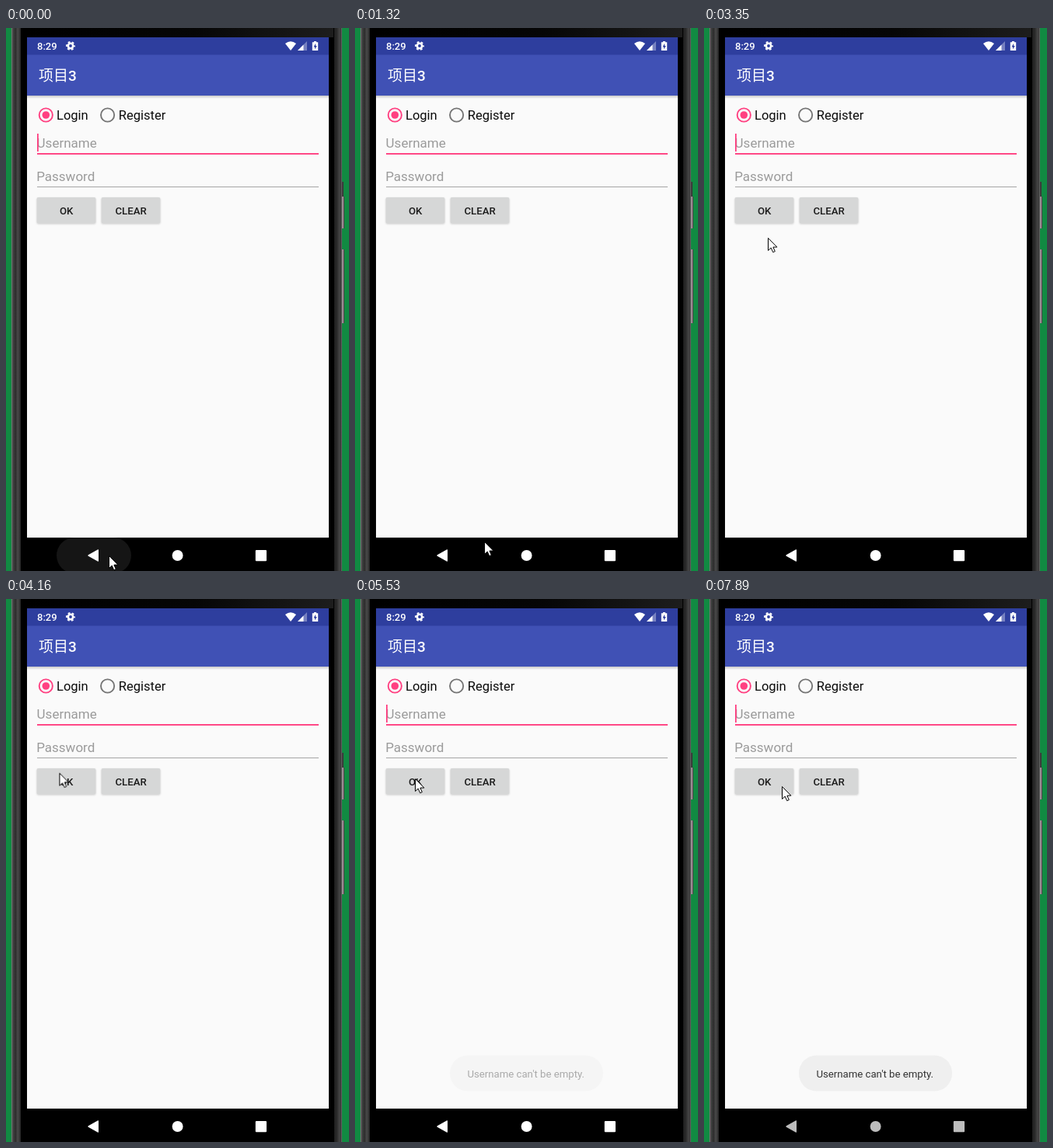
Animation of 441 by 699 pixels, one loop 8000 ms. Source, as an HTML page:

```html
<!DOCTYPE html>
<html lang="en">
<head>
<meta charset="utf-8">
<title>Login form</title>
<style>
  html, body { margin: 0; width: 100%; height: 100%; overflow: hidden; background: #118a42; }
  svg { display: block; width: 441px; height: 699px; }
  text { font-family: Roboto, "Noto Sans CJK SC", "Noto Sans CJK", sans-serif; white-space: pre; }
  .label { font-size: 16.5px; fill: #0c0c0c; }
  .hint { font-size: 17px; fill: #9b9b9b; }
  .caps { font-size: 13.2px; font-weight: 500; fill: #1c1c1c; text-anchor: middle; }
  .key { fill: #d6d7d7; }
  .shade { fill: #000; opacity: .16; filter: blur(.8px); }

  .ripple, .caret, .cursor, .toast, .press, .lift, .nav { animation: 8s linear infinite; }
  .ripple { animation-name: ripple; animation-timing-function: step-end; }
  .caret { animation-name: blink; animation-timing-function: step-end; }
  .cursor { animation-name: move; }
  .toast { animation-name: toast; }
  .press, .lift { opacity: 0; animation-name: press; }
  .nav { fill: #fff; animation-name: dim; }

  @keyframes ripple { 0% { opacity: 1 } 1.25%, 100% { opacity: 0 } }
  @keyframes blink {
    0%, 20.25%, 53.75%, 88.375% { opacity: 1 }
    1.25%, 43.125%, 71.625% { opacity: 0 }
    100% { opacity: 1 }
  }
  @keyframes move {
    0%, 2.5% { transform: translate(132px, 679px) }
    12.75%, 14% { transform: translate(158px, 670px) }
    16.5% { transform: translate(166px, 661px) }
    24% { transform: translate(202px, 598px) }
    30.25% { transform: translate(139px, 419px) }
    35.25% { transform: translate(100px, 365px) }
    41.875% { transform: translate(82px, 270px) }
    45.625% { transform: translate(77px, 244px) }
    50.25%, 51% { transform: translate(64px, 220px) }
    54%, 84.75% { transform: translate(77px, 231px) }
    93.375%, 100% { transform: translate(100px, 241px) }
  }
  @keyframes press {
    0%, 54.25% { opacity: 0 }
    56%, 58.5% { opacity: 1 }
    60.125%, 62% { opacity: .55 }
    66%, 100% { opacity: 0 }
  }
  @keyframes toast {
    0%, 61.6% { opacity: 0 }
    80.375%, 100% { opacity: 1 }
  }
  @keyframes dim {
    0%, 75% { fill: #fff }
    93.375% { fill: #cfcfcf; animation-timing-function: step-end }
    98.625%, 100% { fill: #bdbdbd }
  }
</style>
</head>
<body>
<svg viewBox="0 0 441 699">
  <defs>
    <linearGradient id="left">
      <stop offset="0" stop-color="#858585"/>
      <stop offset=".12" stop-color="#484848"/>
      <stop offset=".4" stop-color="#2c2c2c"/>
      <stop offset=".62" stop-color="#4a4a4a"/>
      <stop offset="1" stop-color="#1c1c1c"/>
    </linearGradient>
    <linearGradient id="right">
      <stop offset="0" stop-color="#1c1c1c"/>
      <stop offset=".4" stop-color="#2a2a2a"/>
      <stop offset=".7" stop-color="#444"/>
      <stop offset=".9" stop-color="#3a3a3a"/>
      <stop offset="1" stop-color="#808080"/>
    </linearGradient>
    <linearGradient id="top">
      <stop offset="0" stop-color="#000"/>
      <stop offset=".55" stop-color="#060606"/>
      <stop offset="1" stop-color="#1d1d1d"/>
    </linearGradient>
    <linearGradient id="fall" x2="0" y2="1">
      <stop offset="0" stop-color="#000" stop-opacity=".2"/>
      <stop offset="1" stop-color="#000" stop-opacity="0"/>
    </linearGradient>
  </defs>

  <!-- phone body -->
  <rect width="441" height="699" fill="#118a42"/>
  <path d="M432 198h2v19h-2z" fill="#3a3a3a"/>
  <path d="M432 217h3v41h-3zM432 285h3v95h-3z" fill="#9b8c93"/>
  <path d="M434 217h1v41h-1zM434 285h1v95h-1z" fill="#4c4449"/>
  <rect x="7" width="13" height="699" fill="url(#left)"/>
  <rect x="421" width="11" height="699" fill="url(#right)"/>
  <rect x="19" width="403" height="699"/>
  <rect x="27" width="394" height="12" fill="url(#top)"/>

  <!-- screen -->
  <rect x="27" y="12" width="388" height="644" fill="#fafafa"/>
  <rect x="27" y="87" width="388" height="4" fill="url(#fall)"/>
  <rect x="27" y="12" width="388" height="23" fill="#2e3e9e"/>
  <rect x="27" y="34.5" width="388" height="52.5" fill="#4051b5"/>
  <text x="40" y="28" font-size="13" font-weight="500" fill="#fff">8:29</text>
  <text x="42" y="68" font-size="19" font-weight="500" fill="#fff"><tspan font-weight="400">项目</tspan>3</text>

  <!-- status icons -->
  <g fill="none" stroke="#fff">
    <circle cx="83" cy="23" r="3.2" stroke-width="2.6"/>
    <circle cx="83" cy="23" r="5.1" stroke-width="1.8" stroke-dasharray="2.7 2.64" stroke-dashoffset="1.35"/>
  </g>
  <path d="M359 20Q366 14.5 373 20L366 29z" fill="#fff"/>
  <path d="M387 17V29H375z" fill="#fff" opacity=".35"/>
  <path d="M382.5 21.5V29H375z" fill="#fff"/>
  <path d="M396 17h3v1.2h2.2V29h-7.4V18.2H396z" fill="#fff"/>
  <path d="M398.2 19.8l-2.7 4.6h1.7v3.2l2.6-4.6h-1.6z" fill="#2e3e9e"/>

  <!-- form -->
  <g fill="none" stroke-width="1.9">
    <circle cx="51.3" cy="112" r="8.6" stroke="#ff4081"/>
    <circle cx="130.6" cy="112" r="8.6" stroke="#757575"/>
  </g>
  <circle cx="51.3" cy="112" r="4.8" fill="#ff4081"/>
  <text class="label" x="65" y="118">Login</text>
  <text class="label" x="144.8" y="118">Register</text>
  <text class="hint" x="39.6" y="154.4">Username</text>
  <text class="hint" x="39.2" y="197">Password</text>
  <rect x="40" y="161" width="362" height="1.9" fill="#ff4081"/>
  <rect x="40" y="204" width="362" height="1.1" fill="#aaa"/>
  <rect class="caret" x="40" y="136" width="1.8" height="23" fill="#ff4081"/>

  <rect class="shade" x="39.5" y="218.8" width="76" height="33.6" rx="2"/>
  <rect class="shade" x="122.5" y="218.8" width="76" height="33.6" rx="2"/>
  <g class="lift"><rect class="shade" x="39" y="219.5" width="77" height="34.5" rx="2"/></g>
  <rect class="key" x="39.7" y="218" width="75.6" height="33.3" rx="1.8"/>
  <rect class="key" x="122.7" y="218" width="75.6" height="33.3" rx="1.8"/>
  <rect class="press" x="39.7" y="218" width="75.6" height="33.3" rx="1.8" fill="#c5c6c6"/>
  <text class="caps" x="77.7" y="239.6">OK</text>
  <text class="caps" x="160.6" y="239.6">CLEAR</text>

  <g class="toast">
    <rect x="122" y="587.5" width="197" height="46" rx="22.5" fill="#efefef"/>
    <text x="144.4" y="615.6" font-size="13.2" fill="#333">Username can't be empty.</text>
  </g>

  <!-- navigation bar -->
  <rect class="ripple" x="65" y="656" width="96" height="46" rx="23" fill="#151515"/>
  <g class="nav">
    <path d="M105.8 678.2L117.8 671.4Q119 670.9 119 672V686Q119 687.1 117.8 686.6L105.8 679.8Q104.8 679 105.8 678.2z"/>
    <circle cx="220.6" cy="679" r="7"/>
    <rect x="320.8" y="672" width="14.2" height="14.2" rx="1"/>
  </g>

  <path class="cursor" d="M.5 .5V16.5L4.2 13.1 6.7 18.7 9.3 17.6 6.9 12.1H11.9z" fill="#fff" stroke="#000"/>
</svg>
</body>
</html>
```
